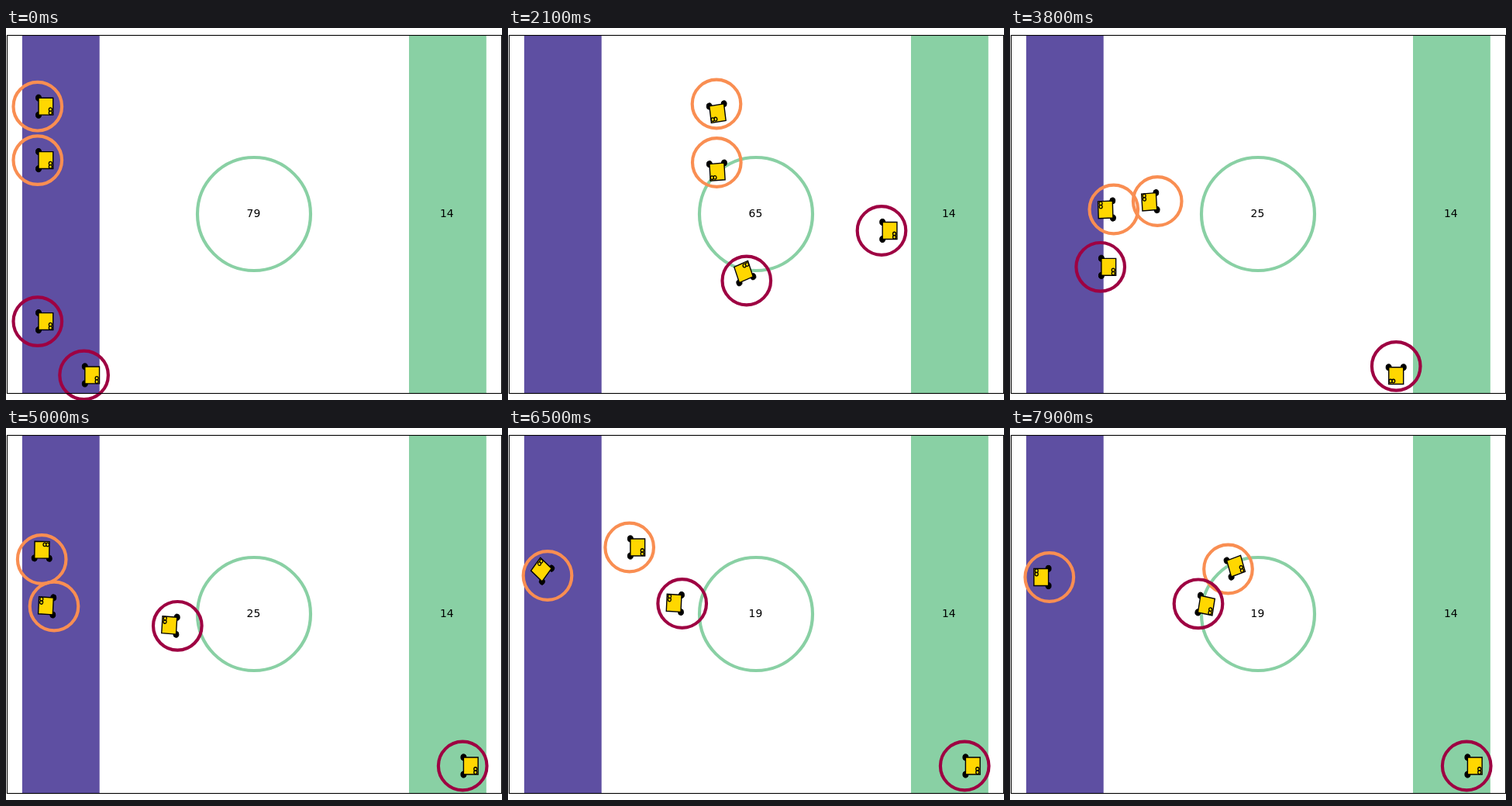
Recreate the animation shown at these times as an HTML page with a canvas. Size 640 by 480 pixels, loop 8000 ms.

```html
<!DOCTYPE html>
<html>
<head>
<meta charset="utf-8">
<style>
html, body { margin: 0; width: 100%; height: 100%; overflow: hidden; background: #fff; }
canvas { display: block; }
</style>
</head>
<body>
<canvas id="stage" width="640" height="480"></canvas>
<script>
const ctx = document.getElementById('stage').getContext('2d');
const TAU = Math.PI * 2;
const LOOP = 8000, STEP = 100;
const SX = 199.4, SY = 231; // pixels per field unit
const GREEN = '#89d0a4', PURPLE = '#5e4fa2', ORANGE = '#f98e52', CRIMSON = '#9e0142';
const STOCK = 79;

// Each robot takes its load from the middle at one step.
// Waypoints: step, x, y, heading in degrees
const robots = [
  { color: ORANGE, load: 20, taken: 27, path: [
    [0, 40.8, 101.2, 0], [21, 269, 98, 82], [27, 268, 184, 95], [38, 190.2, 223.5, 176],
    [50, 62, 230, 183], [65, 51, 190.5, 220], [79, 50.8, 192.5, 180]] },
  { color: ORANGE, load: 20, taken: 24, path: [
    [0, 40.8, 170.6, 0], [21, 269.3, 173.5, 86], [27, 245, 225, 170], [38, 133.8, 234, 178],
    [50, 46.2, 169.5, 271], [55, 45, 160, 360], [65, 156.7, 154, 360], [79, 281.5, 182, 342]] },
  { color: CRIMSON, load: 14, taken: 14, path: [
    [0, 40.8, 378.6, 0], [11, 249.5, 358, 3], [16, 530, 290, -10], [21, 482, 261.5, 0],
    [27, 499, 347, 90], [38, 498.2, 436.4, 90], [46, 589.2, 436, 0]] },
  { color: CRIMSON, load: 6, taken: 57, path: [
    [0, 100.6, 447.9, 0], [11, 298.4, 320.5, -85], [21, 307.8, 326, -111],
    [35, 100, 308, -180], [38, 116.7, 308.3, 0], [50, 221.3, 255.3, 184],
    [57, 302, 275, 180], [65, 224.7, 226.5, 183], [79, 243, 226.8, 370.5]] }
];

// Robots slow a little on approach and make most of each turn on arrival
const approach = u => u * (1.25 - 0.25 * u);
const turn = u => u ** 5;

function poseAt(path, t) {
  const next = path.findIndex(p => p[0] > t);
  if (next < 0) return path[path.length - 1].slice(1);
  const a = path[next - 1], b = path[next];
  const u = (t - a[0]) / (b[0] - a[0]);
  const mix = (i, k) => a[i] + (b[i] - a[i]) * k;
  return [mix(1, approach(u)), mix(2, approach(u)), mix(3, turn(u))];
}

function ring(x, y, r, color) {
  ctx.beginPath();
  ctx.arc(x, y, r, 0, TAU);
  ctx.lineWidth = 4.17;
  ctx.strokeStyle = color;
  ctx.stroke();
}

// Builds the path in field units, then strokes in pixels so lines stay even
function part(x, y, heading, fill, line, trace) {
  ctx.save();
  ctx.translate(x, y);
  ctx.scale(SX, SY);
  ctx.rotate(heading);
  ctx.beginPath();
  trace();
  ctx.restore();
  ctx.fillStyle = fill;
  ctx.fill();
  ctx.lineWidth = line;
  ctx.strokeStyle = '#000';
  ctx.stroke();
}

function drawRobot([x, y, deg], color) {
  const heading = deg * Math.PI / 180;
  const dot = (dx, dy, r, fill, line) =>
    part(x, y, heading, fill, line, () => ctx.arc(dx, dy, r, 0, TAU));
  for (const side of [-1, 1]) dot(0.006, side * 0.048, 0.0175, '#000', 1);
  part(x, y, heading, '#ffd700', 1.4, () => ctx.rect(0.006, -0.0475, 0.094, 0.095));
  for (const dy of [0.0175, 0.036]) dot(0.083, dy, 0.01, '#ffd700', 1.3);
  ring(x, y, 31.3, color);
}

function label(text, x) {
  ctx.fillText(text, x, 244);
}

function draw(t) {
  ctx.fillStyle = '#fff';
  ctx.fillRect(0, 0, 640, 480);
  ctx.fillStyle = PURPLE;
  ctx.fillRect(20.9, 9.5, 99.8, 462);
  ctx.fillStyle = GREEN;
  ctx.fillRect(520, 9.5, 99.8, 462);
  ring(320, 240, 73, GREEN);
  for (const { path, color } of robots) drawRobot(poseAt(path, t), color);

  ctx.strokeStyle = '#000';
  ctx.lineWidth = 1.1;
  ctx.strokeRect(1.5, 9.5, 638, 462);

  ctx.fillStyle = '#000';
  ctx.font = '13.89px "DejaVu Sans", sans-serif';
  ctx.textAlign = 'center';
  label(robots.reduce((left, r) => left - (t >= r.taken ? r.load : 0), STOCK), 319.4);
  label(14, 568.8);
}

function frame() {
  draw(Math.floor(performance.now() % LOOP / STEP));
  requestAnimationFrame(frame);
}
frame();
</script>
</body>
</html>
```
